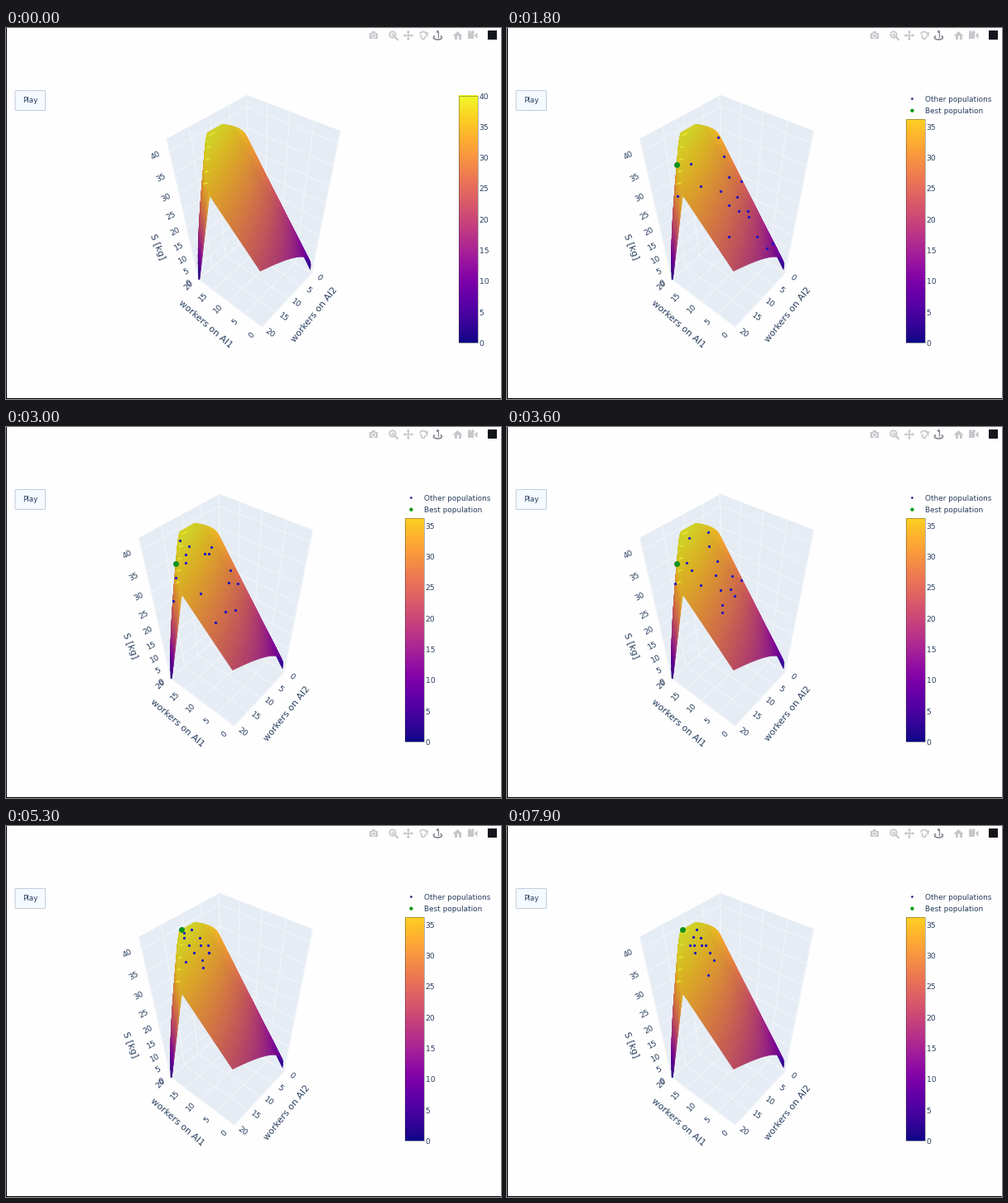
A matplotlib script that plays this animation: 598 by 448 pixels, repeating every 8 s.

```python
import numpy as np
import matplotlib.pyplot as plt
from matplotlib.animation import FuncAnimation
from matplotlib.collections import PolyCollection
from matplotlib.patches import Arc, Circle, FancyBboxPatch, Polygon, Rectangle

W, H = 598, 448
STEP, LOOP = 100, 8000
START, PERIOD = 1710, 512     # timing of the generations, ms
S_MAX = 42.5                  # top of the S axis
INK = "#2a3f5f"
PLASMA = plt.get_cmap("plasma")

plt.rcParams["font.family"] = "DejaVu Sans"
fig = plt.figure(figsize=(W / 100, H / 100), dpi=100, facecolor="#fefefe")
ax = fig.add_axes([0, 0, 1, 1])
ax.set_axis_off()


def text(x, y, s, size=8.9, rot=0, ha="center"):
    return ax.text(x, y, s, fontsize=size * 0.72, color=INK, rotation=rot,
                   ha=ha, va="center_baseline" if rot == 0 else "center")


def line(xs, ys, color, width):
    return ax.plot(xs, ys, color=color, lw=width * 0.72, zorder=2)[0]


def fill(shape, color, z=1):
    shape.set(facecolor=color, edgecolor="none", zorder=z)
    return ax.add_patch(shape)


# ---- camera: projection of the unit box (AI1, AI2, S) onto the stage ----
CORNERS = {(1, 1, 0): (199, 303), (0, 1, 0): (276, 361), (0, 0, 0): (336, 296),
           (1, 0, 0): (261, 250), (1, 1, 1): (160, 134), (1, 0, 1): (258, 81),
           (0, 0, 1): (370, 124)}
HULL = [(1, 1, 1), (1, 0, 1), (0, 0, 1), (0, 0, 0), (0, 1, 0), (1, 1, 0)]


def fit_camera():
    rows, rhs = [], []
    for (x, y, z), (u, v) in CORNERS.items():
        rows.append([x, y, z, 1, 0, 0, 0, 0, -u * x, -u * y, -u * z])
        rows.append([0, 0, 0, 0, x, y, z, 1, -v * x, -v * y, -v * z])
        rhs += [u, v]
    m = np.linalg.lstsq(np.array(rows, float), np.array(rhs, float), rcond=None)[0]
    return np.append(m, 1).reshape(3, 4)


CAMERA = fit_camera()


def project(a, b, z):
    """Stage position of box points; the last axis holds x and y."""
    points = np.stack(np.broadcast_arrays(a, b, z, 1.0))
    u, v, w = np.tensordot(CAMERA, points, 1)
    return np.stack([u / w, v / w], axis=-1)


# ---- surface: output grows with workers until their supply runs out ----
def height(a, b):
    growth = .74 * a + .5 * np.sqrt(b) * (1 - .38 * a)
    supply = 2 * (.98 - a) + 1.75 * (1 - b) ** .73
    return np.clip(np.minimum(growth, supply), 0, .925)


def on_surface(a, b):
    return project(a, b, height(a, b))


def draw_surface(dx, cells=64):
    t = np.linspace(0, 1, cells + 1)
    a, b = np.meshgrid(1 - .97 * t, t ** 1.4, indexing="ij")
    grid = on_surface(a, b) + (dx, 0)
    quads = np.stack([grid[:-1, :-1], grid[1:, :-1], grid[1:, 1:], grid[:-1, 1:]], axis=2)
    mid_a = (a[1:, 1:] + a[:-1, :-1]) / 2
    mid_b = (b[1:, 1:] + b[:-1, :-1]) / 2
    rgba = PLASMA(np.clip(height(mid_a, mid_b) * S_MAX / 40, 0, 1))
    rgba[..., :3] *= (.98 - .12 * np.minimum(1, 4 * mid_b))[..., None]
    order = np.argsort((mid_b - mid_a).ravel())
    mesh = PolyCollection(quads.reshape(-1, 4, 2)[order], zorder=3, lw=.35,
                          facecolors=rgba.reshape(-1, 4)[order], edgecolors="face")
    parts = [ax.add_collection(mesh)]
    for ridge in np.linspace(.52, .7, 6):
        x, y = on_surface(1, ridge) + (dx + 1, 2)
        parts.append(fill(Polygon([(x, y + 2), (x + 7, y), (x + 2, y - 1)]), "#e6e233", 4))
    return parts


def draw_box(dx):
    parts = [fill(Polygon([(CORNERS[c][0] + dx, CORNERS[c][1]) for c in HULL]), "#e6ecf4")]
    segments = []
    for t in np.linspace(0, 1, 5):
        segments += [((t, 0, 0), (t, 1, 0)), ((0, t, 0), (1, t, 0)),
                     ((t, 0, 0), (t, 0, 1)), ((1, t, 0), (1, t, 1))]
    for z in np.arange(0, 41, 5) / S_MAX:
        segments += [((0, 0, z), (1, 0, z)), ((1, 0, z), (1, 1, z))]
    for p, q in segments:
        xs, ys = np.transpose([project(*p), project(*q)])
        parts.append(line(xs + dx, ys, "#f1f4f9", 1.3))
    return parts


def draw_labels(dx):
    parts = []

    def tick(value, rot, *where):
        x, y = project(*where)
        parts.append(text(x + dx, y, str(value), 9.5, rot))

    for s in range(0, 41, 5):
        tick(s, 28, 1.04, 1.12, s / S_MAX)
    for n in range(0, 21, 5):
        tick(n, 45, n / 20 + .02, 1.15, 0)
        tick(n, -36, -.11, n / 20, 0)
    return parts + [text(207 + dx, 358, "workers on AI1", 11, -41),
                    text(339 + dx, 346, "workers on AI2", 11, 51),
                    text(149.5 + dx, 264, "S [kg]", 11, -68)]


def draw_colorbar(x, top):
    scale, base, width = 7.455, 380, 22.5
    ramp = PLASMA(np.linspace(top / 40, 0, 256)[:, None])
    upper = base - scale * top
    parts = [ax.imshow(ramp, extent=(x, x + width, base, upper), aspect="auto", zorder=3),
             ax.add_patch(Rectangle((x, upper), width, base - upper, fc="none",
                                    ec="#444444", lw=.5, alpha=.6, zorder=4))]
    return parts + [text(x + 24.7, base + .3 - scale * s, str(s), 9.3, ha="left")
                    for s in range(0, int(top) + 1, 5)]


def draw_legend():
    parts = []
    for y, name, radius, color in ((85.5, "Other populations", 1.3, "#14147d"),
                                   (99.7, "Best population", 2.2, "#109a18")):
        parts += [fill(Circle((489.5, y), radius), color),
                  text(505, y, name, ha="left")]
    return parts


def draw_toolbar():
    grey, dark, y = "#c6c7cb", "#85878f", 9

    def box(x, top, w, h, color=grey):
        fill(Rectangle((x, top), w, h), color)

    def ring(x, yc, w, h, start, end, color=grey):
        ax.add_patch(Arc((x, yc), w, h, theta1=start, theta2=end, ec=color, lw=1.2))

    # camera
    box(439, 6, 10, 7)
    box(442, 4.5, 4, 2)
    fill(Circle((444, 9.5), 2.8), "white")
    fill(Circle((444, 9.5), 1.8), grey)
    # zoom
    ring(467, 8, 7.4, 7.4, 0, 360)
    line([470, 473], [11, 14], grey, 2.2)
    line([465, 469], [8, 8], grey, 1)
    line([467, 467], [6, 10], grey, 1)
    # pan
    line([481, 491], [y, y], grey, 1.5)
    line([486, 486], [4, 14], grey, 1.5)
    for direction in ((1, 0), (-1, 0), (0, 1), (0, -1)):
        d = np.array(direction)
        tip = (486, y) + 6 * d
        fill(Polygon([tip, tip - 2.5 * d + 2.3 * d[::-1], tip - 2.5 * d - 2.3 * d[::-1]]), grey)
    # orbit and turntable
    ring(504, y, 9, 9, 200, 20)
    ring(504, y, 5, 9, 20, 200)
    fill(Polygon([(506, 6), (510.5, 5), (509, 9.5)]), grey)
    line([521.5, 521.5], [4, 11], dark, 1.3)
    fill(Circle((521.5, 4.5), 1.5), dark)
    ring(521.5, 11.5, 10, 5, -30, 210, dark)
    # home
    fill(Polygon([(539.5, 9.5), (545.5, 4), (551.5, 9.5)]), grey)
    box(541.5, 9, 3, 5)
    box(546.5, 9, 3, 5)
    # film camera
    box(558, 6, 7, 7)
    fill(Polygon([(565.5, 9), (569.5, 5.5), (569.5, 13)]), grey)
    for x in (560, 564):
        fill(Circle((x, 5), 1.8), grey)
    box(581.5, 3, 11.5, 11.5, "#14161c")


def draw_page():
    fill(Rectangle((0, 0), 1, H), "black")
    fill(Rectangle((0, H - 1), W, 1), "black")
    ax.add_patch(FancyBboxPatch((11, 75.5), 36.5, 24, lw=.72, fc="#f4faff", ec="#c3cddb",
                                boxstyle="round,pad=0,rounding_size=1"))
    text(29, 87, "Play")


# ---- populations: drawn towards the peak, with one stray member ----
def population(generation):
    rng = np.random.default_rng(40 + generation)
    members = rng.uniform(.05, 1, (17 - generation // 2, 2))
    peak, spread = np.array([.92, .48]), max(.22, .84 ** generation)
    members[1:] = peak + (members[1:] - peak) * spread
    a, b = np.clip(np.round(members * 20) / 20, .05, 1).T
    return on_surface(a, b)


draw_page()
draw_toolbar()
SHIFT = 33.5
before = (draw_box(SHIFT) + draw_surface(SHIFT) + draw_labels(SHIFT)
          + draw_colorbar(547, 40))
others = ax.scatter([], [], s=(3.2 * .72) ** 2, c="#1512c4", lw=0, zorder=5)
best = ax.scatter([], [], s=(7 * .72) ** 2, c="#0f9120", lw=0, zorder=6)
after = (draw_box(0) + draw_surface(0) + draw_labels(0)
         + draw_colorbar(482, 36.2) + draw_legend() + [others, best])
ax.set(xlim=(0, W), ylim=(H, 0))


def update(i):
    generation = (i * STEP - START) // PERIOD
    shown = generation >= 0
    for part in before:
        part.set_visible(not shown)
    for part in after:
        part.set_visible(shown)
    if shown:
        others.set_offsets(population(generation))
        best.set_offsets([on_surface(1, .53 if generation >= 7 else .65)])
    return before + after


anim = FuncAnimation(fig, update, frames=LOOP // STEP, interval=STEP,
                     repeat=True, repeat_delay=0, blit=False)
plt.show()
```
